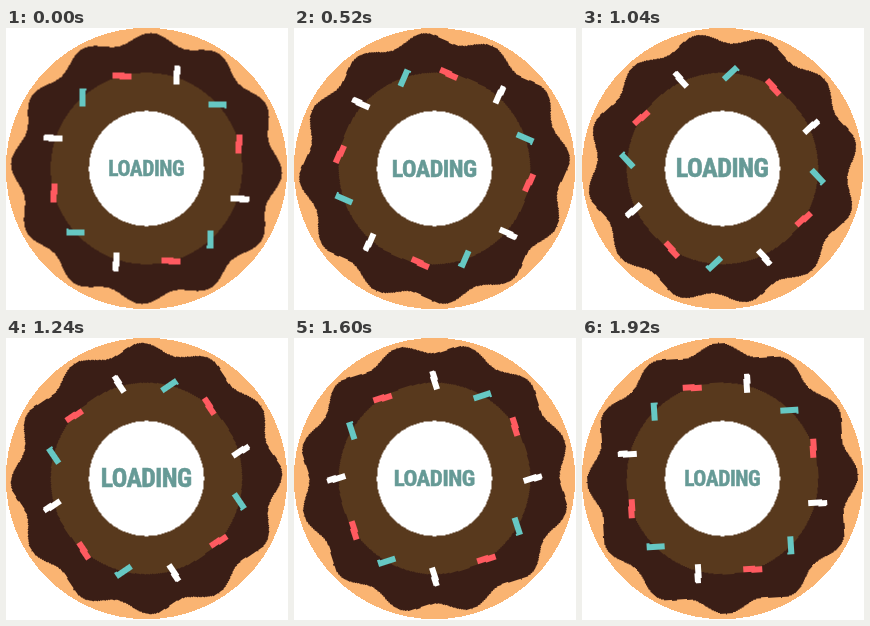
An HTML page for the animation above (2 s loop, 282 by 282 pixels).

```html
<!DOCTYPE html>
<html lang="en">
<head>
<meta charset="utf-8">
<title>Loading</title>
<style>
  html, body { margin: 0; width: 100%; height: 100%; overflow: hidden; background: #fff; }
  svg { display: block; width: 100%; height: 100%; shape-rendering: crispEdges; }

  .topping { animation: turn 2s infinite; }
  .label {
    font: 800 22px "Roboto Condensed", "Open Sans Condensed", "Open Sans", sans-serif;
    font-stretch: condensed;
    letter-spacing: -.02em;
    text-anchor: middle;
    fill: #669a96;
    stroke: #669a96;
    stroke-width: .5px;
    animation: pulse 2s cubic-bezier(.5, 0, .5, 1) infinite;
  }

  /* a quarter turn per loop in 40 ms ticks; the last tick is held twice as long */
  @keyframes turn {
    from { transform: rotate(0deg); animation-timing-function: steps(48); }
    96%, to { transform: rotate(86.4deg); }
  }
  @keyframes pulse {
    from, to { transform: scale(1); }
    50% { transform: scale(1.22); }
  }
</style>
</head>
<body>
<svg viewBox="0 0 282 282">
  <g transform="translate(140.5 140.5)">
    <circle r="140.7" fill="#fab472"/>
    <g class="topping">
      <path id="glaze" fill="#3a1e16"/>
      <circle r="95.8" fill="#58391d"/>
      <g id="sprinkles"></g>
    </g>
    <circle r="57.6" fill="#fff"/>
    <text class="label" id="label" x="-.3" y="-.5" dy=".355em">LOADING</text>
  </g>
</svg>
<script>
  const byId = id => document.getElementById(id);

  // Wavy glaze edge with twelve lobes
  const edge = [];
  for (let deg = 0; deg < 360; deg++) {
    const a = deg * Math.PI / 180;
    const r = 130.4 + 5.2 * Math.cos(12 * (a - 0.037));
    edge.push(`${(r * Math.sin(a)).toFixed(2)} ${(-r * Math.cos(a)).toFixed(2)}`);
  }
  byId("glaze").setAttribute("d", `M${edge.join("L")}Z`);

  // Three sprinkles, repeated in each quarter
  const sprinkles = [
    { x: 30.4, y: -93.4, fill: "#fff" },
    { x: 92.5, y: -24.5, fill: "#ff5a60" },
    { x: -63.9, y: -71, fill: "#66c8c3" }
  ];
  for (const quarter of [0, 90, 180, 270]) {
    for (const { x, y, fill } of sprinkles) {
      const bar = document.createElementNS("http://www.w3.org/2000/svg", "rect");
      const attrs = {
        x: -3.1, y: -9.2, width: 6.2, height: 18.4, fill,
        transform: `rotate(${quarter}) translate(${x} ${y}) rotate(2.5)`
      };
      for (const name in attrs) bar.setAttribute(name, attrs[name]);
      byId("sprinkles").append(bar);
    }
  }

  // Choose the font size at which the word fits the hole
  const label = byId("label");
  label.style.fontSize = `${22 * 76 / label.getComputedTextLength()}px`;
</script>
</body>
</html>
```
